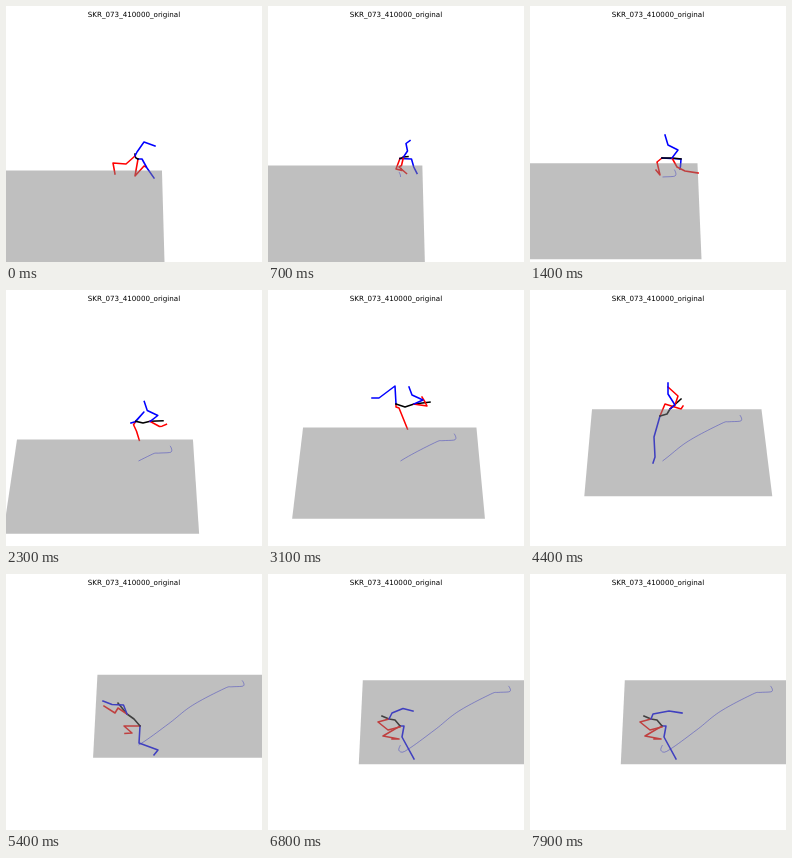
Animation of 256x256 px, one loop 8000 ms. Source, as an HTML page:

```html
<!DOCTYPE html>
<html lang="en">
<head>
<meta charset="utf-8">
<title>Motion plot</title>
<style>
  html, body { margin: 0; height: 100%; overflow: hidden; background: #fff; }
  svg { display: block; width: 100vw; height: 100vh; }
  polyline { fill: none; stroke-width: 1.55; stroke-linejoin: round; stroke-linecap: square; }
  #trail { stroke: #00f; stroke-width: .5; stroke-linecap: butt; }
  #floor { fill: #808080; fill-opacity: .5; }
  text { font: 7.15px "DejaVu Sans", sans-serif; text-anchor: middle; text-rendering: geometricPrecision; }
</style>
</head>
<body>
<svg viewBox="0 0 256 256">
  <polyline id="trail"/>
  <g id="body"></g>
  <polygon id="floor"/>
  <text x="128" y="10.6">SKR_073_410000_original</text>
</svg>
<script>
const LOOP = 8000, STEP = 100;

// The walk over the unit-square floor: time, across, towards the viewer
const WALK = [
  [0, .869, .074], [900, .872, .147], [1400, .803, .158], [1800, .77, .168],
  [3100, .562, .392], [4400, .416, .62], [5400, .248, .86], [5800, .217, .847],
  [6300, .226, .788]
];

// Right leg, left leg, spine, right arm, left arm
const COLORS = ["#f00", "#00f", "#000", "#f00", "#00f"];

// Legs and spine start at the root, arms at the chest
function pose(root, ...limbs) {
  const points = s => s.split(" ").map(p => p.split(",").map(Number));
  const [hip] = points(root);
  const parts = limbs.map(points);
  const chest = parts[2][1];
  return parts.map((part, i) => [i < 3 ? hip : chest, ...part]);
}

const rest = ["132,152", "115,162 131,165 124,165", "136,152 134,163 146,185",
  "127,146 121,145 114,142", "110,148 120,156 132,153"];
const POSES = [
  [0, pose("132,153", "129,170 138,160 140,161", "136,153 141,162 148,172",
    "130,152 129,150 129,148", "120,158 107,157 109,168", "131,146 138,136 149,140")],
  [1400, pose("132,152", "127,156 130,169 126,164", "151,153 150.5,160 150,163",
    "137,152 142,152 151,153", "147,161 155,165 168,167", "148,144 138,139 135,129")],
  [3100, pose("128,114", "128,117 131,118 139.5,139", "127,96 111,108 104,108",
    "137,117 146,114 162,112", "159,116 157,112 154,107", "155,110 144,105 141,97")],
  [4400, pose("130,126", "135,114 151,119 153,116", "124,147 125,167 123,173",
    "137,124 140,119 151,109", "145,115 148,106 138,97", "145,115 138,104 138,93")],
  [5400, pose("134,152", "118,152 126,159 119,159.5", "133,169 152,176 148,181",
    "128,145 121,140 112,129", "112,134 109,139 98,132", "117.5,131 106,130.5 97,127")],
  [6300, pose(...rest, "124,139 135,134.5 145,137")],
  [6800, pose(...rest, "124,139 135,134.5 145,137")],
  [7900, pose(...rest, "123,140 139,137 152,139")]
];

const clamp = k => Math.min(1, Math.max(0, k));
const smooth = k => k * k * (3 - 2 * k);
const mix = (a, b, k) => Array.isArray(a) ? a.map((v, i) => mix(v, b[i], k)) : a + (b - a) * k;

function locate(keys, t) {
  const i = keys.findLastIndex((key, n) => n < keys.length - 1 && key[0] <= t);
  const span = keys[i + 1][0] - keys[i][0];
  return [i, clamp((t - keys[i][0]) / span), span];
}

// Smooth curve through the walk, at rest at both ends
function walk(t) {
  const [i, k, span] = locate(WALK, t);
  const slope = (n, axis) => {
    const a = WALK[n - 1], b = WALK[n + 1];
    return a && b ? (b[axis] - a[axis]) / (b[0] - a[0]) * span : 0;
  };
  return [1, 2].map(axis =>
    mix(WALK[i][axis], WALK[i + 1][axis], smooth(k)) +
    k * (1 - k) * ((1 - k) * slope(i, axis) - k * slope(i + 1, axis)));
}

function figure(t) {
  const [i, k] = locate(POSES, t);
  return mix(POSES[i][1], POSES[i + 1][1], smooth(k));
}

// The camera keeps the walker's spot on the floor at a fixed place
function project([x, z], [rootX, rootZ]) {
  const depth = 1 - .105 * (z - rootZ);
  return [132.5 + 180.5 * (x - rootX) / depth, 171 + 89 * (z - rootZ) / depth];
}

const byId = id => document.getElementById(id);
const trail = byId("trail"), ground = byId("floor");
const lines = COLORS.map(color => {
  const line = document.createElementNS("http://www.w3.org/2000/svg", "polyline");
  line.setAttribute("stroke", color);
  return byId("body").appendChild(line);
});
const setPoints = (el, points) =>
  el.setAttribute("points", points.map(p => p.map(v => v.toFixed(2)).join()).join(" "));

function draw(t) {
  const root = walk(t);
  const corners = [[0, 0], [1, 0], [1, 1], [0, 1]];
  setPoints(ground, corners.map(p => project(p, root)));

  const path = [];
  for (let s = 0; s <= t; s += STEP) path.push(project(walk(s), root));
  setPoints(trail, path);

  figure(t).forEach((limb, i) => setPoints(lines[i], limb));
}

const start = performance.now();
function tick() {
  const t = (performance.now() - start) % LOOP;
  draw(Math.floor(t / STEP) * STEP);
  requestAnimationFrame(tick);
}
tick();
</script>
</body>
</html>
```
